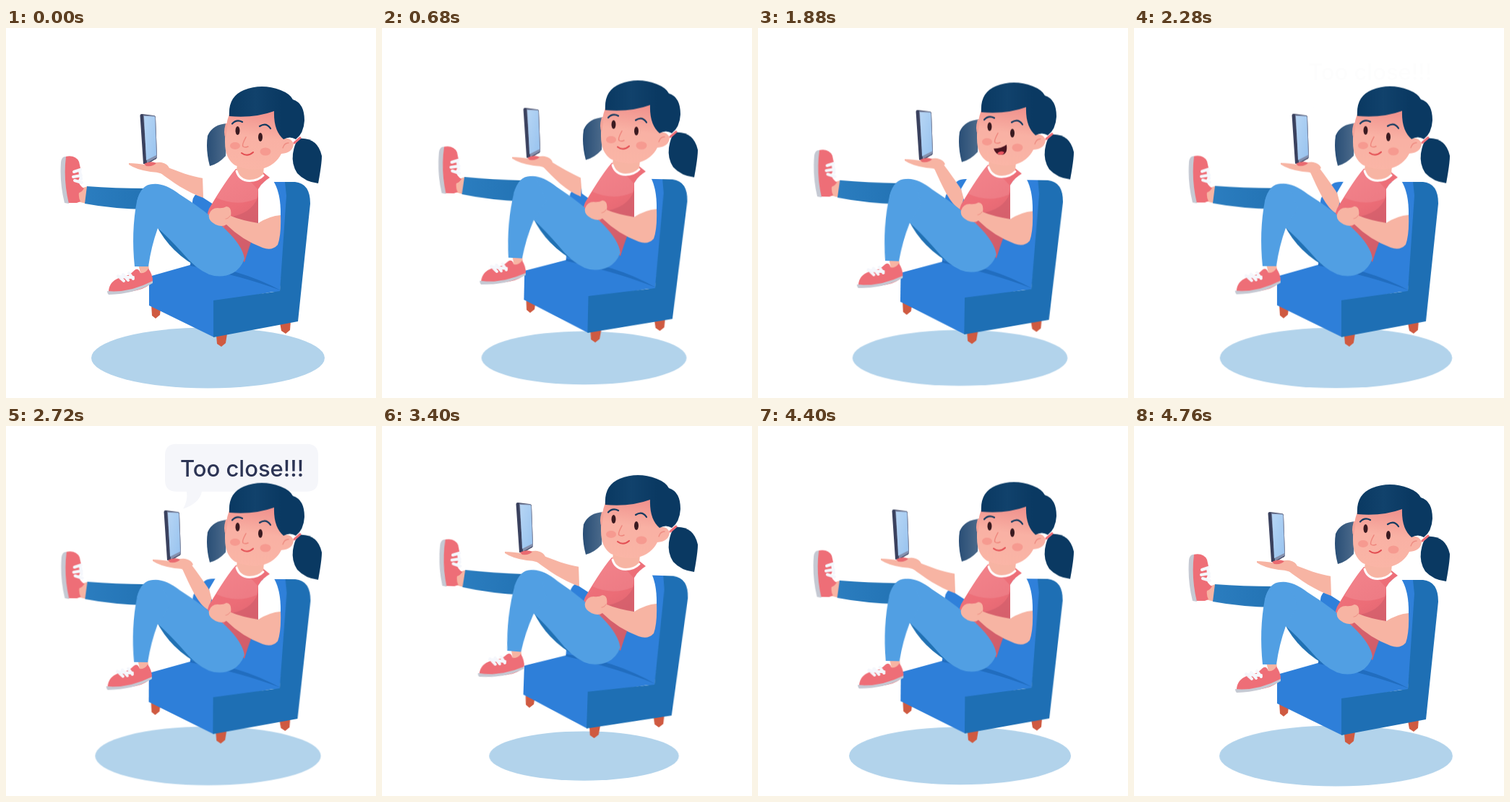
An HTML page that plays this animation: 512x512 px, repeating every 4.8 s.

```html
<!DOCTYPE html>
<html lang="en">
<head>
<meta charset="utf-8">
<title>Too close</title>
<style>
html, body { margin: 0; width: 100%; height: 100%; overflow: hidden; background: #fff; }
svg { display: block; width: 100vw; height: 100vh; }

/* Floating: everything shares one 1.2 s half-cycle */
.up, .legs, .shin, .chair, .shadow {
  animation: up 1.2s cubic-bezier(.37, 0, .63, 1) infinite alternate;
}
.legs { animation-name: legs; transform-origin: 310px 310px; }
.shin { animation-name: shin; transform-origin: 203px 240px; }
.chair { animation-name: chair; transform-origin: 340px 310px; }
.shadow { animation-name: shadow; transform-origin: 279.5px 456.5px; }
@keyframes up { to { transform: translateY(-14px); } }
@keyframes legs { from { transform: translateY(0) rotate(0); } to { transform: translateY(-14px) rotate(2.1deg); } }
@keyframes shin { from { transform: rotate(0); } to { transform: rotate(2.8deg); } }
@keyframes chair { from { transform: translateY(0) rotate(0); } to { transform: translateY(-8px) rotate(2.1deg); } }
@keyframes shadow { to { transform: scale(.8); } }

/* The phone is pulled closer, held, pushed away */
.hand, .forearm, .sleeve { animation: hand 4.8s cubic-bezier(.37, 0, .63, 1) infinite; }
.forearm { animation-name: forearm; }
.sleeve { animation-name: sleeve; }
@keyframes hand {
  0%, 8.33%, 70%, 100% { transform: translateX(0); }
  24%, 57.5% { transform: translateX(33px); }
}
@keyframes forearm {
  0%, 8.33%, 70%, 100% { d: path("M220 191 C238 199 256 205 273 208 L273 235 C250 227 230 213 213 200 Z"); }
  24%, 57.5% { d: path("M255 192 C266 207 277 221 286 237 L280 257 C266 250 254 222 244 200 Z"); }
}
@keyframes sleeve {
  0%, 8.33%, 70%, 100% { d: path("M272 206 L290 198 L318 195 L290 246 L273 235 Z"); }
  24%, 57.5% { d: path("M281 228 L291 211 L318 195 L290 250 L285 243 Z"); }
}

.smile, .laugh { animation: smile 4.8s step-end infinite; }
.laugh { animation-name: laugh; }
@keyframes smile { 0%, 47.5% { opacity: 1; } 25% { opacity: 0; } }
@keyframes laugh { 0%, 47.5% { opacity: 0; } 25% { opacity: 1; } }

.bubble { opacity: 0; animation: bubble 4.8s linear infinite; }
@keyframes bubble {
  0%, 47.5%, 63%, 100% { opacity: 0; }
  50%, 60.5% { opacity: 1; }
}
.bubble text { font: 500 31px Inter, sans-serif; fill: #2c3454; text-anchor: middle; }

.line { fill: none; stroke-linecap: round; stroke-linejoin: round; }
.lace { stroke: #f5f7fc; stroke-width: 4; }
.skin { fill: #f7b4a3; }
.shoe { fill: #ee6e77; }
.sole { fill: #c5c9d3; }
</style>
</head>
<body>
<svg viewBox="0 0 512 512">
  <defs>
    <linearGradient id="tee" x1="0" y1="0" x2=".35" y2="1">
      <stop offset="0" stop-color="#f2757e"/><stop offset=".5" stop-color="#ec6d77"/><stop offset="1" stop-color="#d5606c"/>
    </linearGradient>
    <linearGradient id="face" x1=".6" y1="0" x2=".45" y2="1">
      <stop offset="0" stop-color="#ee8b88"/><stop offset=".5" stop-color="#f9b1a4"/><stop offset="1" stop-color="#fab5a6"/>
    </linearGradient>
    <linearGradient id="hair">
      <stop offset="0" stop-color="#0a3962"/><stop offset=".35" stop-color="#11426c"/><stop offset=".7" stop-color="#0a3962"/>
    </linearGradient>
    <linearGradient id="tail">
      <stop offset="0" stop-color="#294e76"/><stop offset="1" stop-color="#4f6d8d"/>
    </linearGradient>
    <linearGradient id="screen" x1="0" y1="0" x2="1" y2="1">
      <stop offset="0" stop-color="#b7d6f5"/><stop offset="1" stop-color="#98c3ef"/>
    </linearGradient>
    <linearGradient id="jean">
      <stop offset="0" stop-color="#2b7dbf"/><stop offset="1" stop-color="#2373b4"/>
    </linearGradient>
  </defs>

  <ellipse class="shadow" cx="279.5" cy="456.5" rx="161.5" ry="42" fill="#b2d3eb"/>

  <g class="up">
    <g class="bubble">
      <path fill="#f5f6fa" d="M236 27 H416 Q432 27 432 43 V77 Q432 93 416 93 H271 Q268 109 245 117 Q252 105 250 93 H236 Q220 93 220 77 V43 Q220 27 236 27 Z"/>
      <text x="326.5" y="72">Too close!!!</text>
    </g>
    <path fill="url(#tail)" d="M307 132 Q286 133 279 149 Q276 169 282 191 Q294 188 304 177 Z"/>
  </g>

  <g class="chair">
    <g fill="#cf5a41">
      <path d="M201 382 L214 389 L213 397 L207 402 L202 398 Z"/>
      <path d="M291 425 L306 423 L304 436 L298 441 L292 437 Z"/>
      <path d="M379 408 L394 405 L393 418 L387 423 L381 419 Z"/>
    </g>
    <path fill="#2f80da" d="M255 330 L258 240 Q258 232 270 224 Q272 213 286 213 H388 L392 232 L379 366 L300 360 Z"/>
    <path fill="#2e7fd9" d="M198 344 L258 327 Q330 342 380 363 L290 380 L288 428 L198 384 Z"/>
    <path fill="#216dbf" d="M255 326 Q322 332 380 363 Q326 343 255 329 Z"/>
    <path fill="#1e6fb4" d="M386 213 H400 Q421 215 421 243 L404 406 L287 428 V377 L379 364 L388 232 Z"/>
  </g>

  <g class="legs">
    <path class="skin" d="M98 224 L113 219 L111 243 L99 240 Z"/>
    <path class="shoe" d="M82 178 Q96 175 101 185 L103 194 Q104 204 100 211 Q101 218 108 222 Q105 227 101 228 Q100 234 103 240 L98 242 L84 242 Q78 214 82 178 Z"/>
    <path class="sole" d="M76 186 Q77 177 83 178 Q79 210 87 243 L81 242 Q74 214 76 186 Z"/>
    <path class="line lace" d="M94 199 L103 196 M93 206 L104 204 M95 211 L105 214 M102 197 L104 209"/>
    <path fill="url(#jean)" d="M112 219 Q150 222 195 222 V251 Q146 250 109 243 Z"/>
    <path fill="#2171b3" d="M203 262 Q220 304 260 328 L290 341 L270 300 Z"/>
  </g>

  <g class="up">
    <path class="forearm skin" d="M220 191 C238 199 256 205 273 208 L273 235 C250 227 230 213 213 200 Z"/>
    <path class="sleeve" fill="#fff" d="M272 206 L290 198 L318 195 L290 246 L273 235 Z"/>
    <g class="hand">
      <path fill="#3a415e" d="M185.500 121 Q185.500 119 188 119 L204 121 Q207 121 207 124 L209 178 Q209 181 206 182 L196 188 L190 188 Z"/>
      <path fill="#8490ad" d="M190 120.500 L205 121.500 L207 124 L209 179 L195 187 Z"/>
      <path fill="url(#screen)" d="M191 122 L206 122.500 L208 176 L194 183 Z"/>
      <path class="skin" d="M170 187 Q181 187 195 189.500 Q208 185 215 186 Q224 188 226 194 L217 202 Q208 199 200 199 Q180 196 170 189 Z"/>
      <path fill="#ea6a70" d="M191 188 Q200 183 208 187 Q204 192 194 191 Z"/>
    </g>

    <path fill="url(#tee)" d="M318 195 Q306 208 281 250 Q275 264 285 272 L298 290 L330 324 Q334 308 339 296 L350 266 L349 224 Q355 213 365 207 L355 199 Z"/>
    <path fill="#fff" opacity=".1" d="M316 198 Q306 209 291 235 Q320 248 347 236 L349 224 L338 212 Z"/>
    <path fill="#cf5c69" opacity=".6" d="M306 262 Q340 258 349 233 L350 266 L330 324 L298 290 Z"/>
    <path class="skin" d="M320 188 L357 190 L356 203 Q349 212 337 211 Q323 209 319 197 Z"/>
    <path class="line" stroke="#fff" stroke-width="3" d="M319 198 Q323 211 337 211.500 Q349 211.500 356 204"/>
  </g>

  <g class="legs">
    <path fill="#519fe3" d="M181 240 Q187 216 203 216 Q219 214 240 230 Q277 253 304 279 Q327 301 330 319 Q325 333 314 339 Q298 347 281 341 Q262 333 244 311 Q225 290 209 276 Z"/>
    <g class="shin">
      <path class="skin" d="M183 327 H197 L199 341 L187 343 Z"/>
      <path class="shoe" d="M142 364 Q143 351 156 346 Q170 344 178 335 Q183 331 186 339 Q193 340 197 333 Q203 341 203 350 Q196 360 181 363 Q160 368 142 366 Z"/>
      <path class="sole" d="M140 364 Q170 367 203 350 V353 Q178 368 142 369 Q140 367 140 364 Z"/>
      <path class="line lace" d="M155 343 L163 350 M162 341 L169 349 M170 339 L176 347 M155 344 L176 345"/>
      <path fill="#519fe3" d="M181 240 Q173 282 178 330 H197 Q201 302 210 277 L226 250 Q216 217 203 216.500 Q187 217 181 240 Z"/>
    </g>
  </g>

  <g class="up">
    <path fill="#fff" d="M349 223 Q356 210 368 209 Q381 226 380 262 L349 272 Z"/>
    <path class="skin" d="M349 270 Q365 260 380 259 Q381 286 376 300 Q368 309 355 304 Q326 293 305 272 Q299 276 290 272 Q279 266 281 258 Q284 249 293 249 Q300 250 305 247 Q313 248 311 260 Q325 266 349 270 Z"/>
    <path class="line" stroke="#ee9489" stroke-width="1.200" d="M310 260 Q307 264 304 264"/>

    <path fill="#0a3962" d="M405 153 Q431 151 437 177 Q437 188 432 215 Q414 213 403 201 Q395 189 397 174 Q399 160 405 153 Z"/>
    <path fill="url(#face)" d="M310 116 Q302 138 303 158 Q303 181 317 190 Q335 198 354 195 Q373 190 381 174 Q397 173 398 160 Q394 151 384 153 L373 108 Z"/>
    <path fill="#f3a399" d="M304 132 Q300 146 304 152 L307 132 Z"/>
    <path fill="url(#hair)" d="M309 122 Q307 95 329 86 Q354 76 380 86 Q393 91 397 99 Q413 104 413 128 Q412 146 401 154 Q393 149 384 154 Q370 142 371 115 Q344 125 309 122 Z"/>
    <path class="line" stroke="#ee6e77" stroke-width="3" d="M399 159 L407 152"/>
    <path class="line" stroke="#ee8d83" stroke-width="1.300" d="M383 166 Q385 159 391 159"/>
    <g fill="#f5928a" opacity=".75">
      <ellipse cx="317" cy="163" rx="7" ry="5"/>
      <ellipse cx="359" cy="171" rx="7.500" ry="5.500"/>
    </g>
    <g fill="#3a1a20">
      <ellipse cx="320.500" cy="142" rx="3" ry="6"/>
      <ellipse cx="352" cy="151" rx="3" ry="6"/>
    </g>
    <path class="line" stroke="#123a60" stroke-width="2.200" d="M313 132.500 Q319 126 327 130 M351 136 Q360 130 366 139"/>
    <path class="line" stroke="#ee857c" stroke-width="1.500" d="M332 151 Q326 162 328 164 Q331 166 335 164"/>
    <path class="smile line" stroke="#e24b50" stroke-width="2" d="M326 173 Q334 179 342 172"/>
    <g class="laugh">
      <path fill="#4a1420" d="M326 172.500 Q337 172 344 167 Q346 181 336 181 Q329 181 326 172.500 Z"/>
      <path fill="#ea5560" d="M331 179 Q335 174.500 341 177.500 Q339 181 336 181 Q333 181 331 179 Z"/>
    </g>
  </g>
</svg>
</body>
</html>
```
